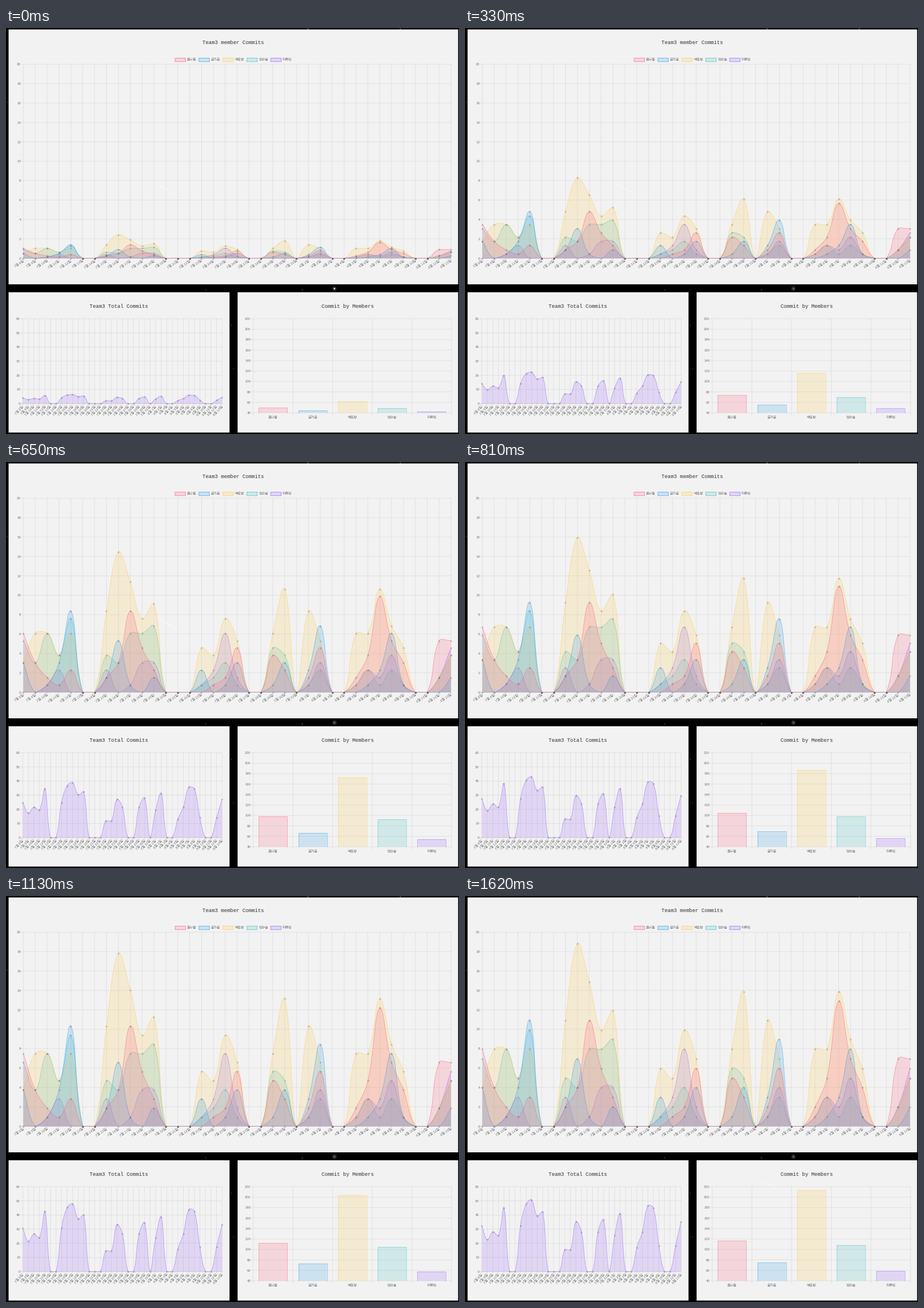
A matplotlib script that plays this animation: 791x708 px, repeating every 3620 ms.

```python
import numpy as np
import matplotlib.pyplot as plt
from matplotlib.animation import FuncAnimation
from matplotlib.patches import PathPatch, Rectangle
from matplotlib.path import Path

W, H, DPI = 791, 708, 64
PT = 72 / DPI  # points per pixel
LOOP, STEP = 3620, 20
HOLD, LAST = 8, 10  # each pose stays 160 ms, pose 10 is the final one

RED, BLUE, YELLOW, TEAL, PURPLE = (
    tuple(c / 255 for c in rgb)
    for rgb in [(255, 99, 132), (54, 162, 235), (255, 206, 86),
                (75, 192, 192), (153, 102, 255)])

DAYS = [f"7월 {d}일" for d in range(8, 32)] + [f"8월 {d}일" for d in range(1, 14)]
IDLE = [5, 6, 12, 13, 14, 19, 20, 23, 26, 27, 33, 34]
ALL_COMMITS = 1.42  # overall commits per commit credited to a member

# Name, colour, bar value, daily rise and fall around a peak, {day: peak}
MEMBERS = [
    ("표나울", RED, 117, .45, .60,
     {0: 8, 4: 3, 9: 11, 18: 6, 21: 5, 25: 6, 30: 13, 35: 7, 36: 7}),
    ("은가온", BLUE, 75, .40, .20,
     {0: 4, 4: 11, 8: 7, 11: 2, 15: 3, 18: 4, 22: 4, 25: 9, 31: 8, 36: 2}),
    ("백도랑", YELLOW, 215, .58, .70,
     {1: 8, 2: 8, 4: 8, 8: 19, 9: 15, 11: 12, 15: 6, 17: 10, 22: 14, 24: 11,
      28: 8, 30: 14, 36: 5}),
    ("연하솔", TEAL, 109, .55, .35,
     {0: 7, 2: 8, 4: 10, 7: 5, 9: 8, 10: 8, 11: 9, 17: 4, 21: 6, 22: 5, 25: 3,
      29: 3, 31: 3, 36: 5}),
    ("마루빈", PURPLE, 59, .45, .30,
     {3: 3, 7: 3, 10: 4, 11: 4, 17: 8, 25: 4, 29: 3, 31: 5, 36: 6}),
]

# Plot areas: left, right, top, bottom
MEMBER_BOX = (30.3, 777, 63.2, 401.5)
TOTAL_BOX = (29.3, 377.3, 507, 655)
BAR_BOX = (431.7, 778, 507, 671)

# First pose, last pose, end points of each streak
METEORS = [(0, 4, (265, 272), (298, 292)), (LAST, LAST, (520, 497.5), (546, 511.5))]


def daily(peaks, rise, fall):
    """Whole commits per day: peaks fade out inside their run of working days."""
    days = np.arange(len(DAYS))
    idle = np.isin(days, IDLE)
    run = np.cumsum(idle)
    out = np.zeros(len(days))
    for day, peak in peaks.items():
        gap = days - day
        bump = peak * np.where(gap < 0, rise, fall) ** np.abs(gap)
        out = np.maximum(out, np.where((run == run[day]) & ~idle, bump, 0))
    return np.floor(out)


def progress(pose):
    """Quartic ease-out over 60 ticks; poses are 3, later 4 ticks apart."""
    tick = 2 + (3 if pose < 4 else 4) * pose
    return 1 - (1 - tick / 60) ** 4


def make_stage():
    ax = fig.add_axes([0, 0, 1, 1])
    ax.set(xlim=(0, W), ylim=(H, 0))
    ax.axis("off")
    return ax


def rect(ax, x, y, w, h, **style):
    return ax.add_patch(Rectangle((x, y), w, h, **{"lw": 0, "snap": False, **style}))


def text(ax, x, y, s, size=6, font="Liberation Sans", color="#747474", **kw):
    kw = {"ha": "center", "va": "center", **kw}
    ax.text(x, y, s, fontsize=size * PT, family=font, color=color, **kw)


def title(ax, x, y, s):
    text(ax, x, y, s, size=9.05, font="Liberation Mono", color="#333333")


def grid(ax, box, xs, low, high, step):
    x0, x1, y0, y1 = box
    style = dict(color="black", lw=0.9 * PT, snap=False)
    for v in range(low, high + 1, step):
        y = y1 + (y0 - y1) * (v - low) / (high - low)
        ax.plot([x0 - 4, x1], [y, y], alpha=0.075 if v else 0.16, **style)
        text(ax, x0 - 4.5, y, str(v), ha="right", va="center_baseline")
    for x in xs:
        ax.plot([x, x], [y0, y1 + 4], alpha=0.075, **style)


def day_axis(ax, box, angle, high, step):
    xs = np.linspace(box[0], box[1], len(DAYS))
    grid(ax, box, xs, 0, high, step)
    for x, day in zip(xs, DAYS):
        text(ax, x + 1, box[3] + 4.5, day, font="Noto Sans CJK JP", ha="right",
             rotation=angle, rotation_mode="anchor")


def draw_static(ax):
    rect(ax, 0, 0, W, H, color="black")
    for x, y, glow in [(527, 1, .6), (688, 1, .5), (348, 456, .3), (517, 456, .4),
                       (393, 518, .25), (397, 594, .25), (2, 129, .3)]:
        ax.plot(x, y, "o", ms=1.8 * PT, mew=0, color="white", alpha=glow)
    for x, y, right, bottom in [(4.5, 2.5, 789.5, 447), (4.5, 460.8, 390.3, 705.5),
                                (404.4, 460.8, 789.5, 705.5)]:
        rect(ax, x, y, right - x, bottom - y, color="#f2f2f2")

    title(ax, 397, 26, "Team3 member Commits")
    title(ax, 197.5, 485, "Team3 Total Commits")
    title(ax, 597, 485, "Commit by Members")

    day_axis(ax, MEMBER_BOX, 33, 20, 2)
    day_axis(ax, TOTAL_BOX, 47, 60, 10)
    edges = np.linspace(BAR_BOX[0], BAR_BOX[1], 6)
    grid(ax, BAR_BOX, edges, 40, 220, 20)

    for i, (name, color, *_) in enumerate(MEMBERS):
        x = 295.2 + 41.75 * i
        rect(ax, x, 52.5, 18.2, 6.2, fc=(*color, .2), ec=(*color, .75), lw=0.9 * PT)
        text(ax, x + 29, 55.3, name, font="Noto Sans CJK JP")
        text(ax, edges[i:i + 2].mean(), 679.2, name, font="Noto Sans CJK JP")


def spline(pts, box, tension=0.4):
    """Cubic control polygon through pts, handles kept inside the box."""
    before = np.vstack([pts[:1], pts[:-1]])
    after = np.vstack([pts[1:], pts[-1:]])
    d0 = np.hypot(*(pts - before).T)
    d1 = np.hypot(*(after - pts).T)
    span = tension * (after - before) / (d0 + d1)[:, None]
    low, high = (box[0], box[2]), (box[1], box[3])
    enter = np.clip(pts - span * d0[:, None], low, high)
    leave = np.clip(pts + span * d1[:, None], low, high)
    return np.stack([enter, pts, leave], axis=1).reshape(-1, 2)[1:-1]


class Area:
    def __init__(self, ax, box, values, high, color, z):
        x0, x1, y0, self.base = box
        xs = np.linspace(x0, x1, len(values))
        self.ys = self.base - values * (self.base - y0) / high
        self.curve = spline(np.column_stack([xs, self.ys]), box)
        self.codes = [Path.MOVETO] + [Path.CURVE4] * (len(self.curve) - 1)
        self.ends = [(x1, self.base), (x0, self.base)]
        blank = Path([(x0, self.base)])
        self.fill = ax.add_patch(PathPatch(blank, fc=(*color, .2), lw=0, zorder=z))
        self.line = ax.add_patch(PathPatch(blank, fill=False, ec=(*color, .52),
                                           lw=0.95 * PT, zorder=z + .1))
        self.dots, = ax.plot(xs, self.ys, "o", ms=3.3 * PT, mew=0, color="black",
                             alpha=0.16, zorder=z + .2)

    def grow(self, p):
        def scale(y):
            return self.base + (y - self.base) * p

        curve = np.column_stack([self.curve[:, 0], scale(self.curve[:, 1])])
        self.line.set_path(Path(curve, self.codes))
        self.fill.set_path(Path(np.vstack([curve, self.ends]),
                                self.codes + [Path.LINETO] * 2))
        self.dots.set_ydata(scale(self.ys))


class Bar:
    def __init__(self, ax, slot, value, color):
        x0, x1, y0, self.base = BAR_BOX
        width = (x1 - x0) / 5
        left = x0 + width * (slot + .14)
        right = left + width * .72
        self.height = (value - 40) * (self.base - y0) / 180
        self.body = rect(ax, left, self.base, right - left, 0, fc=(*color, .2))
        self.edge, = ax.plot([left, left, right, right], [self.base] * 4,
                             color=color, alpha=0.5, lw=0.85 * PT,
                             solid_joinstyle="miter")

    def grow(self, p):
        top = self.base - self.height * p
        self.body.set_height(top - self.base)
        self.edge.set_ydata([self.base, top, top, self.base])


fig = plt.figure(figsize=(W / DPI, H / DPI), dpi=DPI, facecolor="black")

# The unchanging layer is rendered once and reused as a backdrop.
backdrop = make_stage()
draw_static(backdrop)
fig.canvas.draw()
fig.figimage(np.array(fig.canvas.buffer_rgba())[..., :3], zorder=-1)
backdrop.remove()

stage = make_stage()
charts, total = [], 0
for i, (_, color, value, rise, fall, peaks) in enumerate(MEMBERS):
    commits = daily(peaks, rise, fall)
    total = total + commits
    charts += [Area(stage, MEMBER_BOX, commits, 20, color, 10 - i),
               Bar(stage, i, value, color)]
charts.append(Area(stage, TOTAL_BOX, total * ALL_COMMITS, 60, PURPLE, 3))

star, = stage.plot(573, 454, "o", ms=3 * PT, mew=0, color="white")
stage.plot(573, 454, "o", ms=8 * PT, mew=0, color="white", alpha=0.15)
streaks = [stage.plot(*zip(a, b), color="white", lw=1.3 * PT, alpha=0.5)[0]
           for _, _, a, b in METEORS]


def update(i):
    pose = min(i // HOLD, LAST)
    for chart in charts:
        chart.grow(progress(pose))
    star.set_alpha(max(0.8 - 0.4 * pose, 0.3))
    for streak, (first, last, *_) in zip(streaks, METEORS):
        streak.set_visible(first <= pose <= last)
    return []


anim = FuncAnimation(fig, update, frames=LOOP // STEP, interval=STEP,
                     init_func=lambda: [], repeat=True, repeat_delay=0)
plt.show()
```
